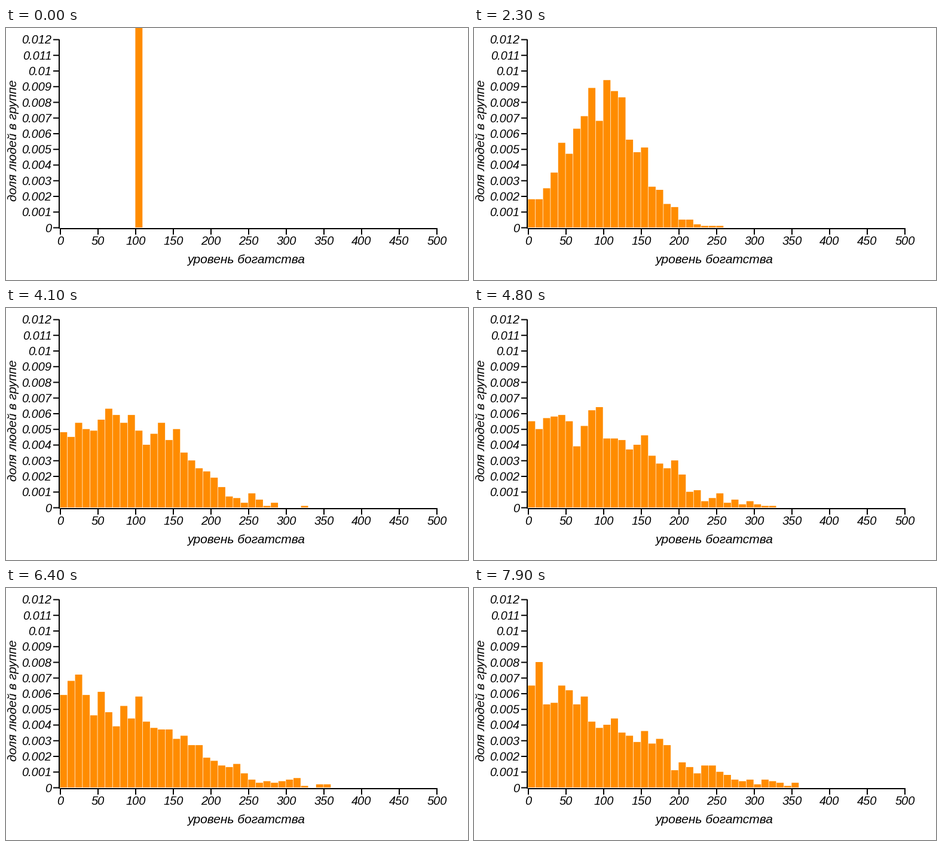
Recreate the animation shown at these times as a matplotlib script. Size 773 by 422 pixels, loop 8000 ms.

```python
import matplotlib.pyplot as plt
import numpy as np
from matplotlib.animation import FuncAnimation
from matplotlib.patches import Rectangle

W, H, DPI = 773, 422, 128
HOLD, STEPS, BINS = 10, 70, 50
X0, Y0 = 90, 334            # plot corner, in pixels from the top left
BIN_W, UNIT_H = 12.6, 2.625  # one bin, one person
PEOPLE, START = 1000, 100
ROUNDS = 150                # exchanges per step


def simulate():
    """Everyone who has money gives one coin to a random person each round."""
    rng = np.random.default_rng(7)
    wealth = np.full(PEOPLE, START)
    rows = []
    for _ in range(STEPS + 1):
        rows.append(np.bincount(wealth // 10, minlength=BINS)[:BINS])
        for _ in range(ROUNDS):
            givers = wealth > 0
            takers = rng.integers(0, PEOPLE, np.count_nonzero(givers))
            wealth = wealth - givers + np.bincount(takers, minlength=PEOPLE)
    return rows


def box(x, y, w, h, color="black", **kw):
    return ax.add_patch(Rectangle((x, y), w, h, fc=color, lw=0, **kw))


def label(x, y, text, px=20, **kw):
    ax.text(x, y, text, fontsize=px * 72 / DPI, family="Liberation Sans",
            style="italic", va="baseline", rotation_mode="anchor", **kw)


fig = plt.figure(figsize=(W / DPI, H / DPI), dpi=DPI, facecolor="white")
ax = fig.add_axes([0, 0, 1, 1])
ax.set(xlim=(0, W), ylim=(H, 0))
ax.axis("off")

# Axes and ticks
box(88, 19, 2, 317)
box(90, 335, 632, 2)
for k in range(13):
    y = 334.5 - 26.25 * k
    box(79, y - 1, 10, 2, snap=False)
    label(76.5, y + 7, f"{k / 1000:g}", ha="right")
for k in range(11):
    x = 91 + 63 * k
    box(x - 1, 335, 2, 11)
    label(x, 363, str(50 * k), ha="center")

label(402, 394, "уровень богатства", 21, ha="center")
label(18.2, 188.5, "доля людей в группе", 21, ha="center", rotation=90)

counts = simulate()
bars = [box(X0 + 0.4 + BIN_W * k, Y0, 11.9, 0, "#ff8c00", snap=False, zorder=3)
        for k in range(BINS)]


def draw(i):
    for bar, n in zip(bars, counts[max(0, i - HOLD + 1)]):
        bar.set_height(-UNIT_H * n)
    return bars


anim = FuncAnimation(fig, draw, frames=HOLD + STEPS, interval=100,
                     repeat=True, repeat_delay=0, blit=False)
plt.show()
```
